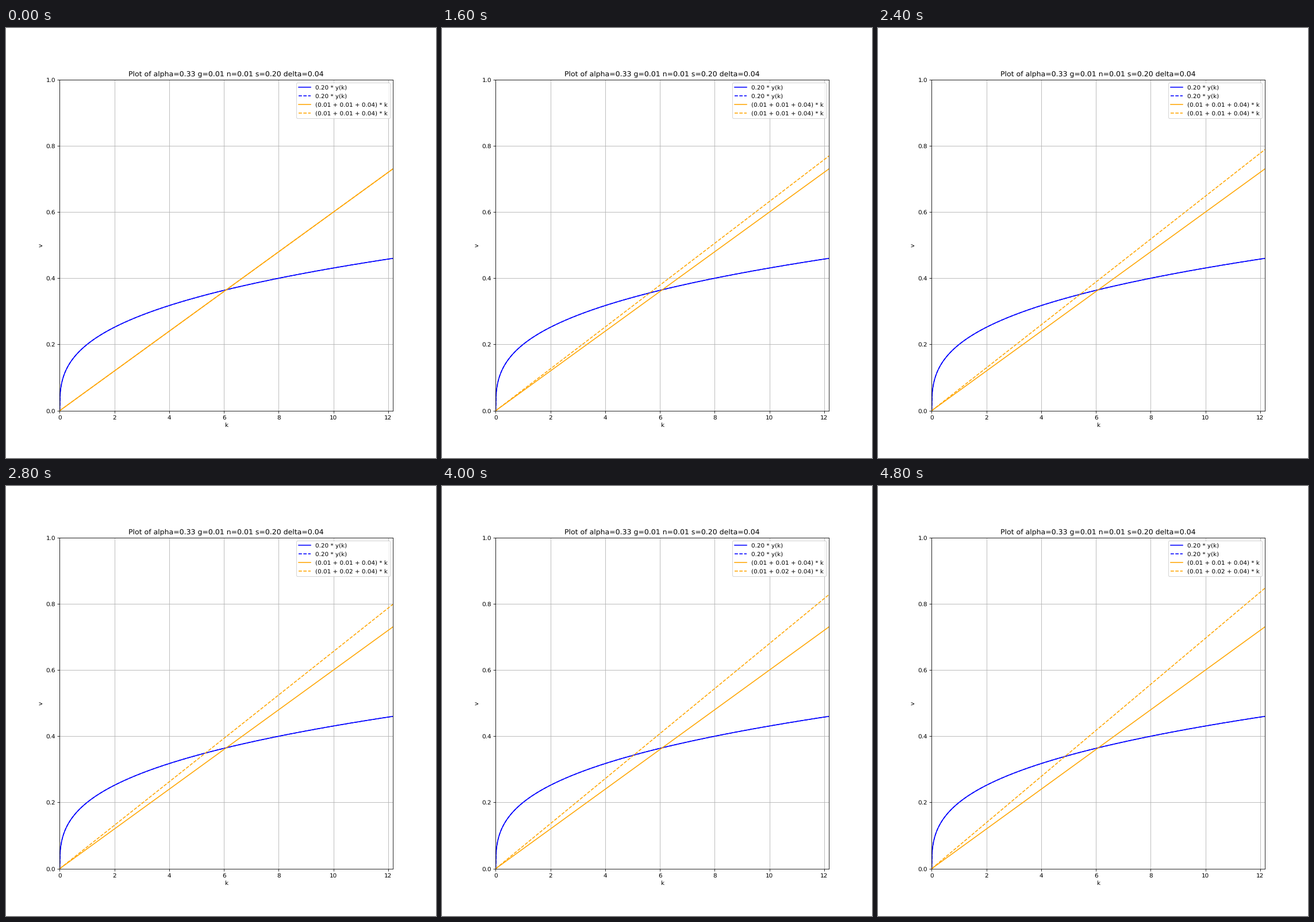
Animation, 748 px wide and 748 px high, one loop 5 s. Source, as a matplotlib script:

```python
import matplotlib.pyplot as plt
import numpy as np
from matplotlib.animation import FuncAnimation

SIZE, INCHES = 748, 10
FRAMES, INTERVAL = 25, 200

plt.rcParams["text.hinting"] = "none"

# Solow growth model parameters
alpha, g, n, s, delta = 1 / 3, 0.01, 0.01, 0.20, 0.04
n_end = 0.02

steady_k = (s / (g + n + delta)) ** (1 / (1 - alpha))
k = np.linspace(0, 2 * steady_k, 1000)
saving = s * k ** alpha


def saving_label():
    return f"{s:.2f} * y(k)"


def break_even_label(growth):
    return f"({g:.2f} + {growth:.2f} + {delta:.2f}) * k"


def break_even(growth):
    return (g + growth + delta) * k


fig, ax = plt.subplots(figsize=(INCHES, INCHES), dpi=SIZE / INCHES)
fig.subplots_adjust(left=0.1249, right=0.8999, bottom=0.1101, top=0.8801)
ax.plot(k, saving, "-", color="blue", label=saving_label())
ax.plot(k, saving, "--", color="blue", label=saving_label())
ax.plot(k, break_even(n), "-", color="orange", label=break_even_label(n))
moving_line, = ax.plot(k, break_even(n), "--", color="orange",
                       label=break_even_label(n))

ax.set(xlim=(0, 2 * steady_k), ylim=(0, 1), xlabel="k", ylabel="v")
ax.set_title(f"Plot of alpha={alpha:.2f} g={g:.2f} n={n:.2f} "
             f"s={s:.2f} delta={delta:.2f}")
ax.grid(True)
moving_text = ax.legend(loc="upper right").get_texts()[-1]


def update(frame):
    growth = n + (n_end - n) * frame / FRAMES
    moving_line.set_ydata(break_even(growth))
    moving_text.set_text(break_even_label(growth))
    return moving_line, moving_text


anim = FuncAnimation(fig, update, frames=FRAMES, interval=INTERVAL,
                     repeat=True, repeat_delay=0)
plt.show()
```
